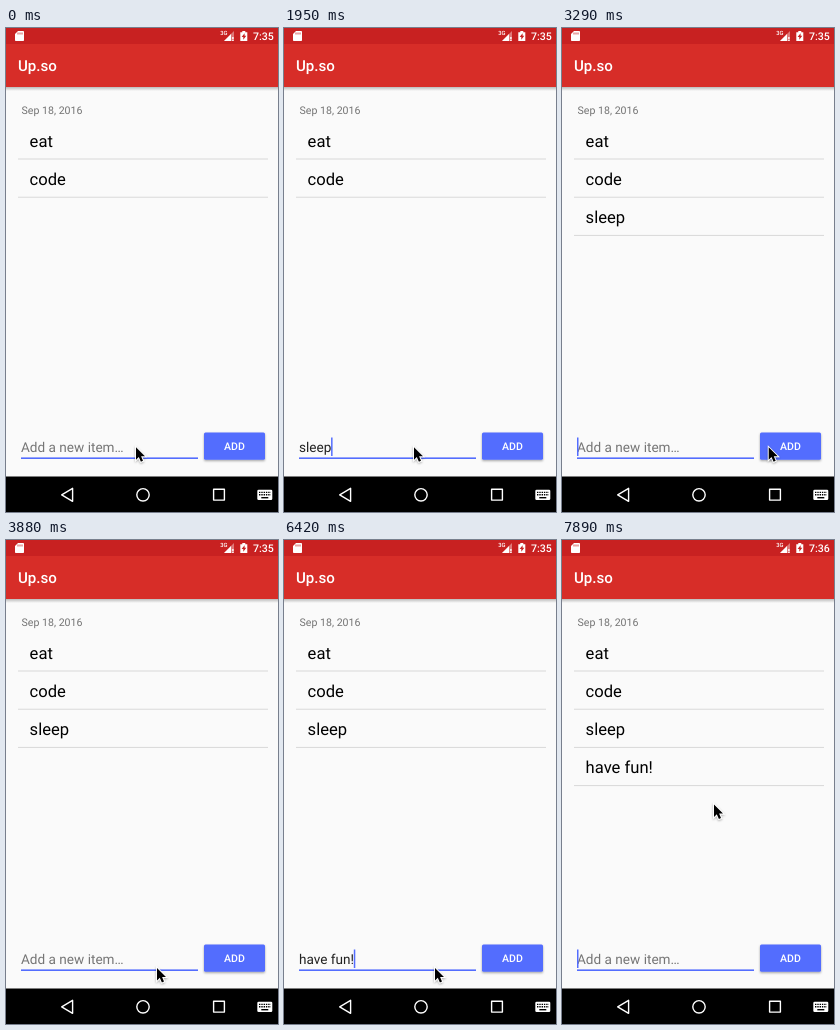
An HTML page that plays this animation: 272x484 px, repeating every 8000 ms.

```html
<!DOCTYPE html>
<html lang="en">
<head>
<meta charset="utf-8">
<title>To-do list</title>
<style>
  html, body { margin: 0; width: 100%; height: 100%; overflow: hidden; background: #fafafa; }
  svg { display: block; width: 100vw; height: 100vh; }
  text { font-family: Roboto, sans-serif; white-space: pre; text-rendering: geometricPrecision; }
  .medium { font-weight: 500; fill: #fff; }
  .small { font-size: 10.58px; }
  .item { font-size: 16.6px; }
  .field { font-size: 13.6px; }
</style>
</head>
<body>
<svg viewBox="0 0 272 484">
  <defs>
    <linearGradient id="barShadow" x2="0" y2="1">
      <stop stop-color="#000" stop-opacity=".25"/>
      <stop offset="1" stop-color="#000" stop-opacity="0"/>
    </linearGradient>
    <filter id="buttonShadow" x="-10%" y="-20%" width="120%" height="150%">
      <feDropShadow dx="0" dy="1.2" stdDeviation="1" flood-opacity=".35"/>
    </filter>
    <filter id="pointerShadow" x="-50%" y="-30%" width="200%" height="170%">
      <feDropShadow dx="0" dy="1" stdDeviation=".9" flood-opacity=".35"/>
    </filter>
  </defs>

  <rect width="272" height="484" fill="#fafafa"/>
  <rect y="59" width="272" height="4" fill="url(#barShadow)"/>
  <rect width="272" height="59" fill="#d72d28"/>
  <rect width="272" height="16" fill="#c82121"/>

  <!-- status bar -->
  <path d="M12 3h5.2q.8 0 .8.8v8.4q0 .8-.8.8h-7.4q-.8 0-.8-.8V6z" fill="#fff"/>
  <path d="M12 4.5v2M14 4.5v2M16 4.5v2" stroke="#c82121" stroke-width=".8"/>
  <text x="214.3" y="7.3" font-size="5.8" class="medium">3G</text>
  <path d="M228 3v10h-10z" fill="#fff" fill-opacity=".4"/>
  <path d="M225 6v7h-7zM226.2 9h1.4v2.2h-1.4zM226.2 12h1.4v1h-1.4z" fill="#fff"/>
  <path d="M234.3 4.2h2V3h3v1.2h2V13h-7z" fill="#fff"/>
  <path d="M238.6 5.2l-3 3.8h1.7v2.8l3-4h-1.7z" fill="#c82121"/>
  <text id="clock" x="247" y="11.6" class="medium small"></text>

  <text x="12" y="43.3" font-size="15.1" class="medium">Up.so</text>
  <text x="15.6" y="86.4" class="small" fill="#737373">Sep 18, 2016</text>
  <g id="list"></g>

  <!-- entry row -->
  <text id="entry" x="15" y="424" class="field"></text>
  <rect x="15" y="429.4" width="177" height="1.6" fill="#536dfe"/>
  <rect id="caret" y="409.5" width="1.5" height="18.5" fill="#536dfe"/>
  <rect x="198" y="404.5" width="61" height="27.3" rx="1.5" fill="#536dfe" filter="url(#buttonShadow)"/>
  <text x="228.5" y="422" text-anchor="middle" class="medium small">ADD</text>

  <!-- navigation bar -->
  <rect y="448.5" width="272" height="35.5" fill="#000"/>
  <g fill="none" stroke="#fff" stroke-width="1.4" stroke-linejoin="round">
    <path d="M55.7 466.8L66.6 460.3V473.3z"/>
    <circle cx="137" cy="466.8" r="6.2"/>
    <rect x="207.6" y="461.3" width="10.8" height="10.8"/>
  </g>
  <rect x="251.3" y="461.7" width="15" height="10.3" rx="1.3" fill="#fff"/>
  <g stroke="#000" stroke-width="1.4" stroke-dasharray="1.4 .9">
    <path d="M253 464.4h11.8M253 466.8h11.8"/>
    <path d="M255.3 469.7h7" stroke-dasharray="none"/>
  </g>

  <path id="pointer" d="M0 0V12.4L2.8 9.8 4.9 14.4 7 13.5 5.1 9H9z" fill="#000"
        stroke="#fff" stroke-width="1.8" paint-order="stroke" filter="url(#pointerShadow)"/>
</svg>
<script>
const LOOP = 8000;
const ITEMS = ["eat", "code", "sleep", "have fun!"];
const HINT = "Add a new item…";
const byId = id => document.getElementById(id);
const list = byId("list"), entry = byId("entry"), caret = byId("caret");
const pointer = byId("pointer"), clock = byId("clock");

const rows = ITEMS.map((label, i) => {
  const row = document.createElementNS("http://www.w3.org/2000/svg", "g");
  row.setAttribute("transform", `translate(0 ${i * 38.2})`);
  row.innerHTML = `<text x="23.6" y="118.8" class="item">${label}</text>
    <rect x="12" y="130.5" width="250" height="1" fill="#d9d9d9"/>`;
  list.append(row);
  return row;
});

// Each step holds until the next one and changes only the listed values.
const start = { text: "", items: 2, caret: false, at: [130, 419.3], clock: "7:35" };
const typing = (word, times) =>
  times.map((time, i) => [time, { text: word.slice(0, i + 1), caret: true }]);
const steps = [
  [450, { caret: true }],
  ...typing("sleep", [750, 1050, 1350, 1650, 1950]),
  [2250, { caret: false }],
  [2400, { at: [150, 423] }],
  [2550, { at: [186, 422] }],
  [2700, { at: [206.7, 419.3] }],
  [3290, { text: "", items: 3, caret: true }],
  [3730, { at: [180, 424], caret: false }],
  [3880, { at: [151, 428] }],
  ...typing("have fun!", [4330, 4630, 4930, 5080, 5220, 5370, 5520, 5820, 6420]),
  [6720, { caret: false }],
  [6870, { at: [190, 424] }],
  [7020, { at: [222, 418] }],
  [7310, { text: "", items: 4, caret: true }],
  [7600, { at: [219, 405] }],
  [7740, { at: [198, 361] }],
  [7890, { at: [152, 264.5], clock: "7:36" }],
];

function stateAt(time) {
  return steps.reduce((state, [from, change]) =>
    time >= from ? { ...state, ...change } : state, start);
}

function draw(now) {
  const state = stateAt(now % LOOP);
  entry.textContent = state.text || HINT;
  entry.setAttribute("fill", state.text ? "#212121" : "#757575");
  caret.setAttribute("x", 15 + (state.text ? entry.getComputedTextLength() - 0.3 : 0));
  caret.setAttribute("visibility", state.caret ? "visible" : "hidden");
  rows.forEach((row, i) =>
    row.setAttribute("visibility", i < state.items ? "visible" : "hidden"));
  pointer.setAttribute("transform", `translate(${state.at})`);
  clock.textContent = state.clock;
}

const begin = performance.now();
function tick() {
  draw(performance.now() - begin);
  requestAnimationFrame(tick);
}
tick();
</script>
</body>
</html>
```
